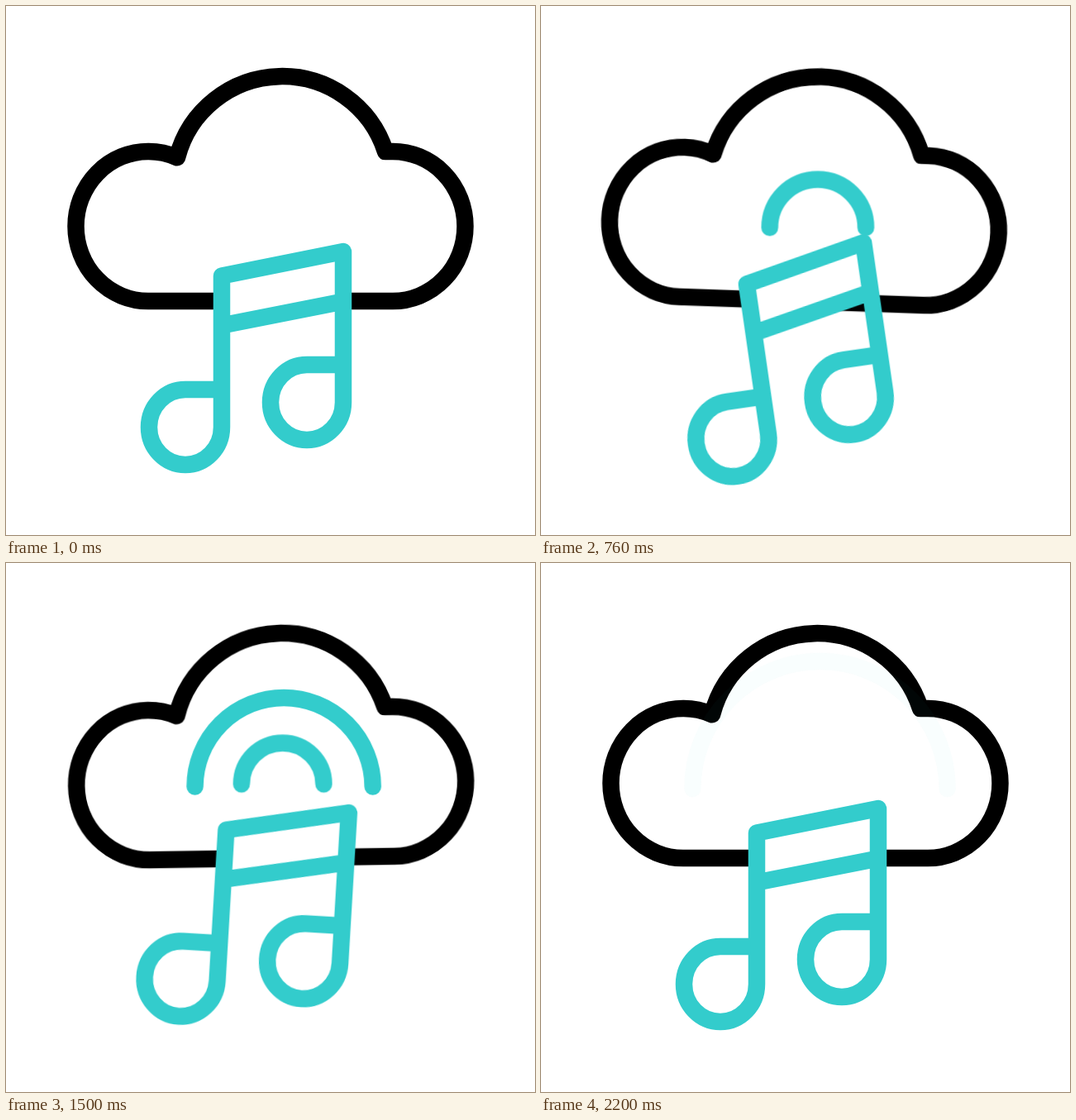
Animation of 640 by 640 pixels, one loop 2400 ms. Source, as an HTML page:

```html
<!DOCTYPE html>
<html lang="en">
<head>
<meta charset="utf-8">
<title>Cloud music</title>
<style>
  html, body { margin: 0; width: 100%; height: 100%; overflow: hidden; background: #fff; }
  svg { display: block; width: 640px; height: 640px; }
  path { fill: none; stroke-width: 20.5; stroke-linecap: round; stroke-linejoin: round; }

  .cloud { stroke: #000; }
  .note path, .ring { stroke: #33cccc; }
  .note .gap { fill: #fff; stroke: none; }

  .cloud, .note { animation: 2400ms cubic-bezier(.333, 0, .667, 1) infinite; }
  .cloud { transform-origin: 320px 220px; animation-name: sway; }
  .note { transform-origin: 324px 416px; animation-name: swing; }

  .ring {
    vector-effect: non-scaling-stroke;
    transform-origin: 0 0;
    animation: grow 2400ms var(--start) linear infinite both,
               fade 2400ms var(--start) linear infinite both;
  }

  /* damped swings, settled at 1800 ms */
  @keyframes sway {
    0%, 75%, 100% { transform: rotate(0deg); }
    25% { transform: rotate(10.7deg); }
    37.5% { transform: rotate(-5deg); }
    50% { transform: rotate(2.7deg); }
    62.5% { transform: rotate(-.85deg); }
  }
  @keyframes swing {
    0%, 75%, 100% { transform: rotate(0deg); }
    25% { transform: rotate(-35deg); }
    37.8% { transform: rotate(15deg); }
    50.3% { transform: rotate(-9deg); }
    62.7% { transform: rotate(3.4deg); }
  }

  /* each wave lives for 900 ms; --rest keeps the last one faintly until the loop ends */
  @keyframes grow {
    0% { transform: scale(.107); animation-timing-function: cubic-bezier(.333, .416, .667, .821); }
    37.5%, 100% { transform: scale(1.542); }
  }
  @keyframes fade {
    0% { opacity: 0; }
    5%, 25% { opacity: 1; }
    37.4% { opacity: .03; }
    37.6%, 45.74% { opacity: var(--rest, 0); }
    45.75%, 100% { opacity: 0; }
  }
</style>
</head>
<body>
<svg viewBox="0 0 640 640">
  <path class="cloud" d="M172 357A87.5 90.5 0 0 1 172 176A87.5 90.5 0 0 1 207 183.3A131.3 131.3 0 0 1 459 176H468A87.5 90.5 0 0 1 468 357Z"/>
  <g transform="translate(333.3 265)">
    <path class="ring" style="--start: 518ms" d="M-97.3 5.2A100 100 0 0 1 102.7 5.2"/>
    <path class="ring" style="--start: 975ms" d="M-97.3 5.2A100 100 0 0 1 102.7 5.2"/>
    <path class="ring" style="--start: 1302ms; --rest: .03" d="M-97.3 5.2A100 100 0 0 1 102.7 5.2"/>
  </g>
  <g class="note">
    <path class="gap" d="M261 326L408 297V357L261 387Z"/>
    <path d="M261 464H217a44 45.5 0 0 0 0 91a44 45.5 0 0 0 44 -45.5V326.5L408 297V479.5a44 45.5 0 0 1 -44 45.5a44 45.5 0 0 1 0 -91H408M261 386.5L408 357.5"/>
  </g>
</svg>
</body>
</html>
```
